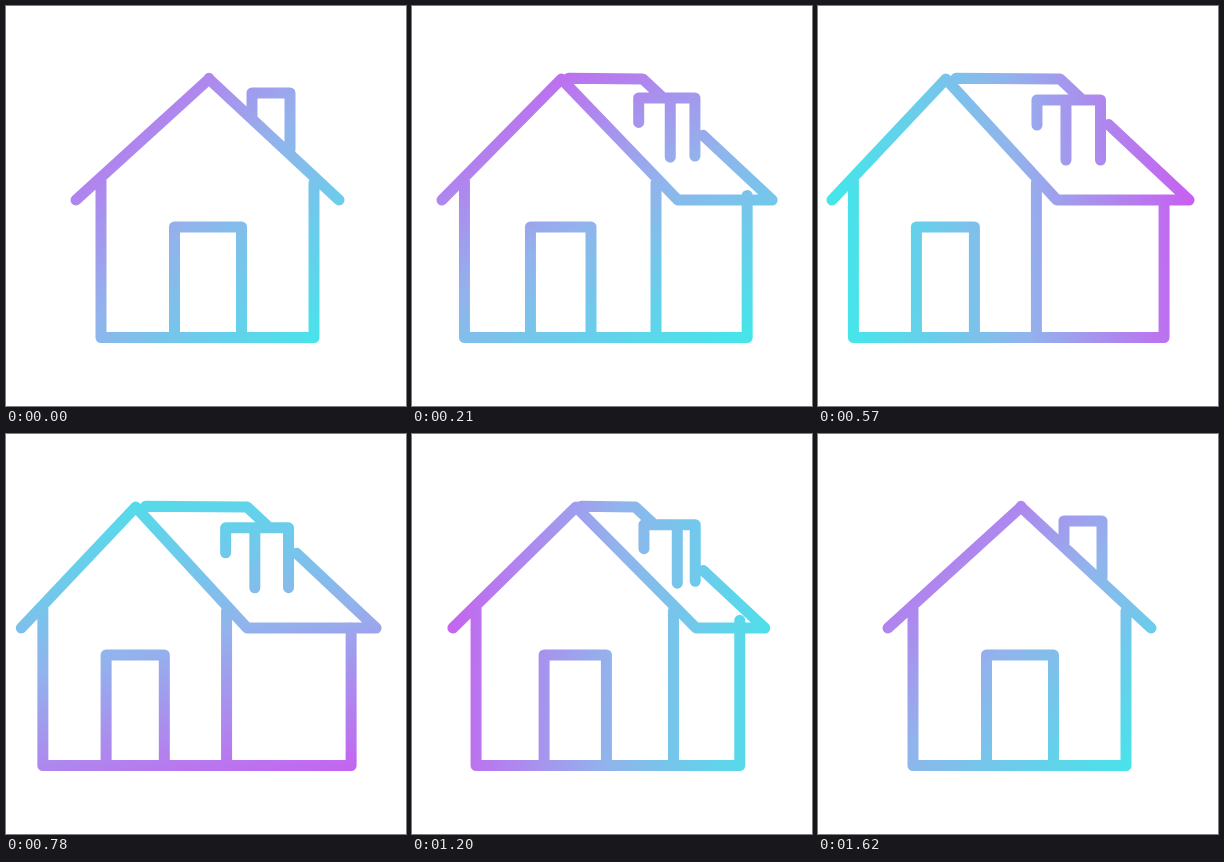
Animation of 400 by 400 pixels, one loop 4150 ms. Source, as an HTML page:

```html
<!DOCTYPE html>
<html lang="en">
<head>
<meta charset="utf-8">
<title>Turning house</title>
<style>
  html, body { margin: 0; width: 100%; height: 100%; overflow: hidden; background: #fff; }
  svg { display: block; width: 100%; height: 100%; }
</style>
</head>
<body>
<svg viewBox="0 0 400 400">
  <defs>
    <linearGradient id="tint" gradientUnits="userSpaceOnUse">
      <stop offset="0" stop-color="#c85ff0"/>
      <stop offset="0.5" stop-color="#92b3ec"/>
      <stop offset="1" stop-color="#47e4ea"/>
    </linearGradient>
  </defs>
  <path id="house" fill="none" stroke="url(#tint)" stroke-width="11"
        stroke-linecap="round" stroke-linejoin="round"/>
</svg>
<script>
const LOOP = 4150, MOVE = 1620, STEP = 30;
const RIDGE = 73, EAVE = 194, BASE = 331.5;
const house = document.getElementById('house');
const tint = document.getElementById('tint');

// Each key is [time, value]
const turnKeys = [[0, 0], [100, 0.32], [210, 0.715], [400, 0.945], [600, 1.003],
  [960, 0.916], [1080, 0.8], [1200, 0.52], [1380, 0.092], [1620, 0]];
const spinKeys = [[0, 0], [210, 15], [570, 130], [960, 273], [1200, 318], [1380, 347], [1620, 360]];

// Monotone cubic interpolation, flat at both ends
function ease(keys, t) {
  const secant = i => (keys[i + 1][1] - keys[i][1]) / (keys[i + 1][0] - keys[i][0]);
  const slope = i => {
    if (i === 0 || i === keys.length - 1) return 0;
    const a = secant(i - 1), b = secant(i);
    return a * b > 0 ? 2 * a * b / (a + b) : 0;
  };
  let i = 0;
  while (i < keys.length - 2 && t >= keys[i + 1][0]) i++;
  const [t0, v0] = keys[i], [t1, v1] = keys[i + 1];
  const span = t1 - t0, u = (t - t0) / span, w = 1 - u;
  return v0 * w * w * (1 + 2 * u) + v1 * u * u * (1 + 2 * w)
    + span * u * w * (slope(i) * w - slope(i + 1) * u);
}

const line = (...points) => 'M' + points.map(p => p.map(n => n.toFixed(2)).join(' ')).join('L');

function housePath(turn) {
  const mix = (front, side) => front + (side - front) * turn;
  const apex = mix(203, 128), backApex = mix(203, 242);
  const eaveL = mix(70, 14), eaveR = mix(333, 239), backEave = mix(333, 371);
  const wallL = mix(95, 35.5), wallM = mix(308, 218.5), wallR = mix(308, 346);
  const doorL = mix(168.5, 98.5), doorR = mix(235.5, 156.5);
  const stackL = mix(246, 219), stackM = mix(284, 248), stackR = mix(284, 282.5);
  const stackTop = mix(87, 94);

  // The back slope is hidden behind the chimney
  const run = (backEave - backApex) / (EAVE - RIDGE);
  const onSlope = x => [x, RIDGE + (x - backApex) / run];
  const hideFrom = Math.max(stackL, backApex + run * (stackTop - RIDGE));
  const hideTo = stackR + 8;

  return [
    line([eaveL, EAVE], [apex, RIDGE], [eaveR, EAVE], [backEave, EAVE], onSlope(hideTo)),
    line([apex + 10 * turn, RIDGE - 0.7], [backApex, RIDGE], onSlope(hideFrom)),
    line([wallL, 175], [wallL, BASE], [wallR, BASE], [wallR, mix(178, EAVE)]),
    line([wallM, 177], [wallM, BASE]),
    line([doorL, BASE], [doorL, 221], [doorR, 221], [doorR, BASE]),
    line([stackL, mix(110, 119)], [stackL, stackTop], [stackR, stackTop], [stackR, mix(140, 154)]),
    line([stackM, stackTop], [stackM, mix(144, 154)])
  ].join('');
}

function aimTint(degrees) {
  const a = degrees * Math.PI / 180, dx = 175 * Math.cos(a), dy = 175 * Math.sin(a);
  const ends = { x1: 200 + dx, y1: 202 + dy, x2: 200 - dx, y2: 202 - dy };
  for (const key in ends) tint.setAttribute(key, ends[key].toFixed(2));
}

function draw(ms) {
  const t = Math.min(MOVE, Math.floor(ms % LOOP / STEP) * STEP);
  house.setAttribute('d', housePath(ease(turnKeys, t)));
  aimTint(225 + ease(spinKeys, t));
}

const start = performance.now();
function tick() {
  draw(performance.now() - start);
  requestAnimationFrame(tick);
}
tick();
</script>
</body>
</html>
```
